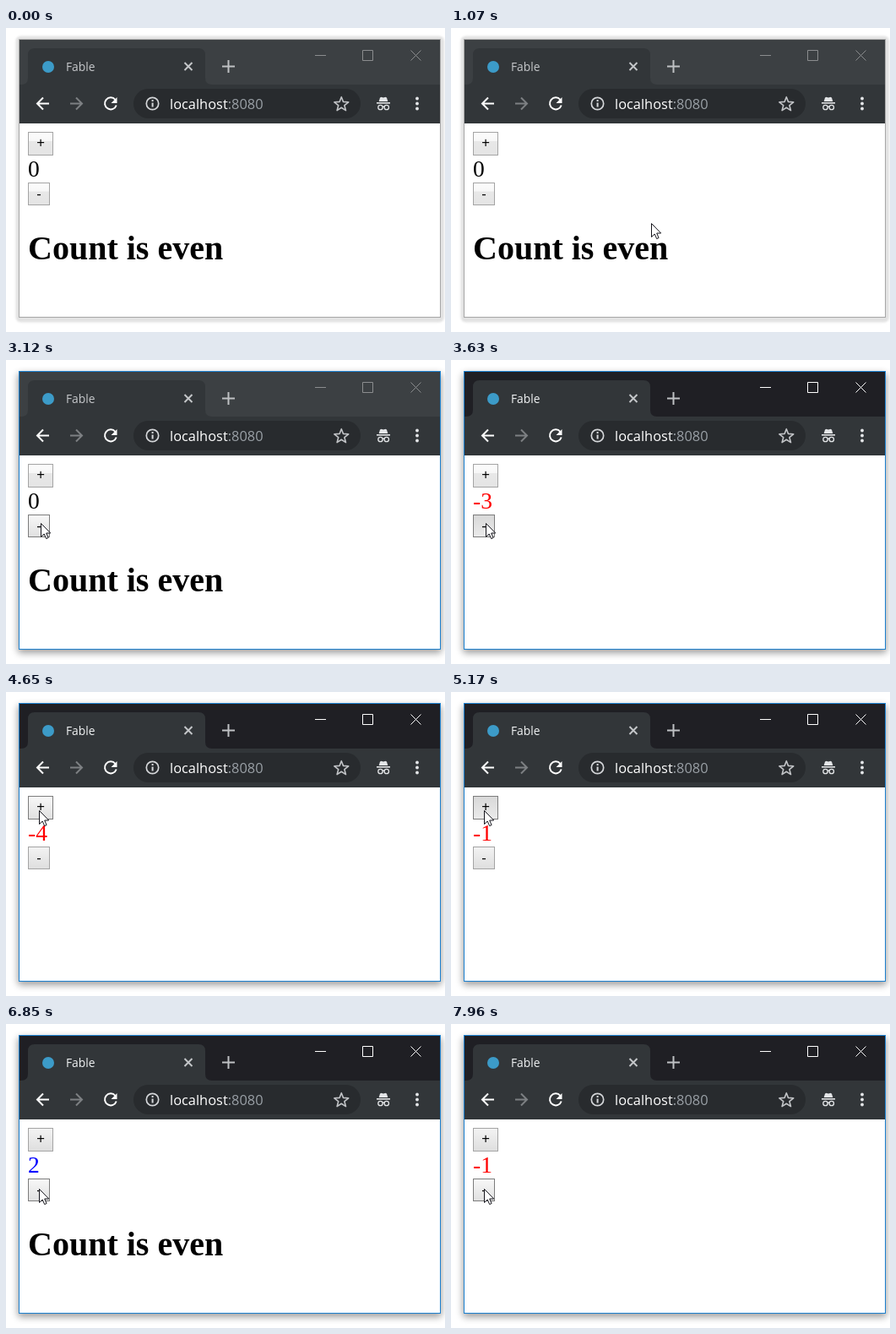
Animation, 520 px wide and 360 px high, one loop 8 s. Source, as an HTML page:

```html
<!DOCTYPE html>
<html lang="en">
<head>
<meta charset="utf-8">
<title>Counter</title>
<style>
  html, body { margin: 0; width: 100%; height: 100%; overflow: hidden; background: #fff; }
  svg { display: block; width: 520px; height: 360px; }
  .ui { font-family: "Open Sans", "Noto Sans", sans-serif; }
  .page { font-family: "Liberation Serif", "Times New Roman", serif; }
  .btn { font: 16.6px "Liberation Sans", Arial, sans-serif; }
  .line { fill: none; stroke-width: 2; }
</style>
</head>
<body>
<svg viewBox="0 0 520 360">
  <defs>
    <linearGradient id="flat" x2="0" y2="1">
      <stop offset="0" stop-color="#fcfcfc"/><stop offset=".38" stop-color="#f7f7f7"/>
      <stop offset=".39" stop-color="#e8e8e8"/><stop offset="1" stop-color="#e4e4e4"/>
    </linearGradient>
    <linearGradient id="idle" x2="0" y2="1">
      <stop offset="0" stop-color="#f3f3f3"/><stop offset="1" stop-color="#dedede"/>
    </linearGradient>
    <linearGradient id="hover" x2="0" y2="1">
      <stop offset="0" stop-color="#f8f8f8"/><stop offset="1" stop-color="#e0e0e0"/>
    </linearGradient>
    <linearGradient id="down" x2="0" y2="1">
      <stop offset="0" stop-color="#d8d8d8"/><stop offset="1" stop-color="#ebebeb"/>
    </linearGradient>
  </defs>

  <rect id="dimShadow" x="11.5" y="9.5" width="507.500" height="339" rx="6" fill="#e2e2e2" style="filter:blur(.8px)"/>
  <rect id="litShadow" x="14" y="16" width="502" height="331" rx="3" fill="#000" opacity=".38" style="filter:blur(4.500px)"/>

  <rect x="15" y="13" width="500" height="330" fill="#fff"/>
  <rect id="titleBar" x="15" y="13" width="500" height="55"/>
  <path d="M18 67q8 0 8-8V32q0-8 8-8H228q8 0 8 8V59q0 8 8 8H515V113H15V67z" fill="#323639"/>

  <circle cx="50" cy="46" r="7" fill="#3c9bc8"/>
  <g class="ui">
    <text id="tabName" x="71" y="51" font-size="13.8">Fable</text>
    <rect x="151" y="72" width="269" height="35" rx="17.500" fill="#282b2e"/>
    <text x="194" y="96" font-size="16.400" fill="#fff">localhost<tspan fill="#9aa0a6">:8080</tspan></text>
  </g>

  <path class="line" d="M211.500 41l9 9m0-9l-9 9" stroke="#c4c6c9"/>
  <path class="line" d="M256 45.500h15m-7.500-7.500v15" stroke="#bfc1c4"/>
  <path id="controls" class="line" d="M366 32.500h13M422.500 26.500h12v12h-12zM479.500 26.500l12 12m0-12l-12 12" style="stroke-width:1"/>

  <path class="line" d="M51 89.500H37m7-7l-7 7 7 7" stroke="#fff"/>
  <path class="line" d="M76 89.500H90m-7-7l7 7-7 7" stroke="#7d8083"/>
  <path class="line" d="M129.500 85a7 7 0 1 0 1.200 6.500" stroke="#fff"/>
  <path d="M131.500 82v7h-7z" fill="#fff"/>
  <circle class="line" cx="173.500" cy="89.500" r="7.200" stroke="#d5d7da" style="stroke-width:1.700"/>
  <path d="M172.600 85h2v2h-2zM172.600 88.500h2v5h-2z" fill="#d5d7da"/>
  <path id="star" class="line" stroke="#c2c4c7" stroke-linejoin="round" style="stroke-width:1.600"/>
  <g fill="#e4e6e8">
    <path d="M443 82.500l1.500-.8 2.500.7 2.500-.7 1.500.8 1.300 4.500h-10.600z"/>
    <rect x="439" y="88" width="16" height="1.600"/>
    <path class="line" d="M446 93.500q1.200-1 2.400 0" stroke="#e4e6e8" style="stroke-width:1.300;fill:none"/>
    <circle cx="443.500" cy="94" r="2.700" fill="none" stroke="#e4e6e8" stroke-width="1.300"/>
    <circle cx="450.800" cy="94" r="2.700" fill="none" stroke="#e4e6e8" stroke-width="1.300"/>
    <circle cx="487" cy="83.500" r="1.900"/><circle cx="487" cy="89.500" r="1.900"/><circle cx="487" cy="95.500" r="1.900"/>
  </g>

  <g class="btn" text-anchor="middle">
    <rect id="plus" x="26.500" y="123.500" width="29" height="27"/>
    <text x="41" y="141">+</text>
    <rect id="minus" x="26.500" y="183.500" width="25" height="26"/>
    <text x="39" y="202">-</text>
  </g>
  <g class="page">
    <text id="count" x="26" y="176" font-size="27.500"></text>
    <text id="message" x="26" y="274" font-size="40" font-weight="bold"></text>
  </g>

  <rect id="frame" x="15.500" y="13.500" width="499" height="329" fill="none"/>
  <path id="cursor" d="M.5.500V16.500L4.200 13l2.500 5.600 2.400-1.100L6.700 12h5z" fill="#fff" stroke="#15151c" stroke-linejoin="round"/>
</svg>
<script>
const LOOP = 8000, ACTIVATE = 3120, DARKEN = 3150;
const el = Object.fromEntries([...document.querySelectorAll('svg [id]')].map(n => [n.id, n]));
const linear = p => p;
const easeOut = p => 1 - (1 - p) ** 1.6;
const easeInOut = p => p * p * (3 - 2 * p);

// Pointer moves: start, end, steps, from, to, easing
const moves = [
  [320, 1070, 12, [411, 346], [237, 231], easeOut],
  [1170, 1950, 13, [237, 231], [72, 211], linear],
  [1980, 2750, 13, [66, 208], [31, 189], easeOut],
  [2850, 2980, 3, [34, 190], [41, 193], linear],
  [3870, 4650, 13, [41, 193], [39, 140], easeInOut],
  [6230, 6850, 10, [39, 140], [39, 195], easeInOut]
];

// Clicks: press, release, change of count
const clicks = [
  [3150, 3180, -1], [3320, 3390, -1], [3460, 3550, -1], [3620, 3690, -1],
  [4710, 4790, 1], [4860, 4940, 1], [5020, 5100, 1], [5170, 5250, 1],
  [5460, 5520, 1], [5690, 5750, 1],
  [7390, 7450, -1], [7510, 7570, -1], [7910, 7960, -1]
];

function pointer(t) {
  const move = moves.filter(m => t >= m[0]).pop();
  if (!move) return null;
  const [start, end, steps, from, to, ease] = move;
  const p = Math.min(1, (t - start) / (end - start));
  const k = ease(Math.floor(p * (steps - 1) + 1e-6) / (steps - 1));
  return from.map((v, i) => Math.round(v + (to[i] - v) * k));
}

function paintButton(node, over, pressed, fresh) {
  const look = pressed ? 'down' : over ? 'hover' : fresh ? 'flat' : 'idle';
  node.setAttribute('fill', `url(#${look})`);
  node.setAttribute('stroke', over || pressed ? '#7c7c7c' : '#a4a4a4');
}

function inside(node, at) {
  if (!at) return false;
  const [x, y, w, h] = ['x', 'y', 'width', 'height'].map(a => +node.getAttribute(a));
  return at[0] >= x && at[0] <= x + w && at[1] >= y && at[1] <= y + h;
}

function draw(t) {
  const active = t >= ACTIVATE, dark = t >= DARKEN;
  el.dimShadow.setAttribute('visibility', active ? 'hidden' : 'visible');
  el.litShadow.setAttribute('visibility', active ? 'visible' : 'hidden');
  el.frame.setAttribute('stroke', active ? '#1b80cf' : '#a6a6a6');
  el.titleBar.setAttribute('fill', dark ? '#1f1f24' : '#3c4043');
  el.controls.setAttribute('stroke', dark ? '#fff' : '#8b8d8f');
  el.tabName.setAttribute('fill', dark ? '#f1f3f4' : '#c6c8cb');

  const at = pointer(t);
  el.cursor.setAttribute('visibility', at ? 'visible' : 'hidden');
  if (at) el.cursor.setAttribute('transform', `translate(${at})`);

  const held = clicks.find(([down, up]) => t >= down && t < up);
  paintButton(el.plus, inside(el.plus, at), held && held[2] > 0, t < 4650);
  paintButton(el.minus, inside(el.minus, at), held && held[2] < 0, !active);

  const count = clicks.reduce((sum, [, up, step]) => sum + (t >= up ? step : 0), 0);
  el.count.textContent = count;
  el.count.setAttribute('fill', count > 0 ? '#00f' : count < 0 ? '#f00' : '#000');
  el.message.textContent = count < 0 ? '' : `Count is ${count % 2 ? 'odd' : 'even'}`;
}

const points = Array.from({ length: 10 }, (_, i) => {
  const a = i * Math.PI / 5 - Math.PI / 2, r = i % 2 ? 3.8 : 8.8;
  return [397.3 + r * Math.cos(a), 90.5 + r * Math.sin(a)].map(v => v.toFixed(1));
});
el.star.setAttribute('d', `M${points.join('L')}z`);

const begin = performance.now();
function tick() {
  draw((performance.now() - begin) % LOOP);
  requestAnimationFrame(tick);
}
tick();
</script>
</body>
</html>
```
